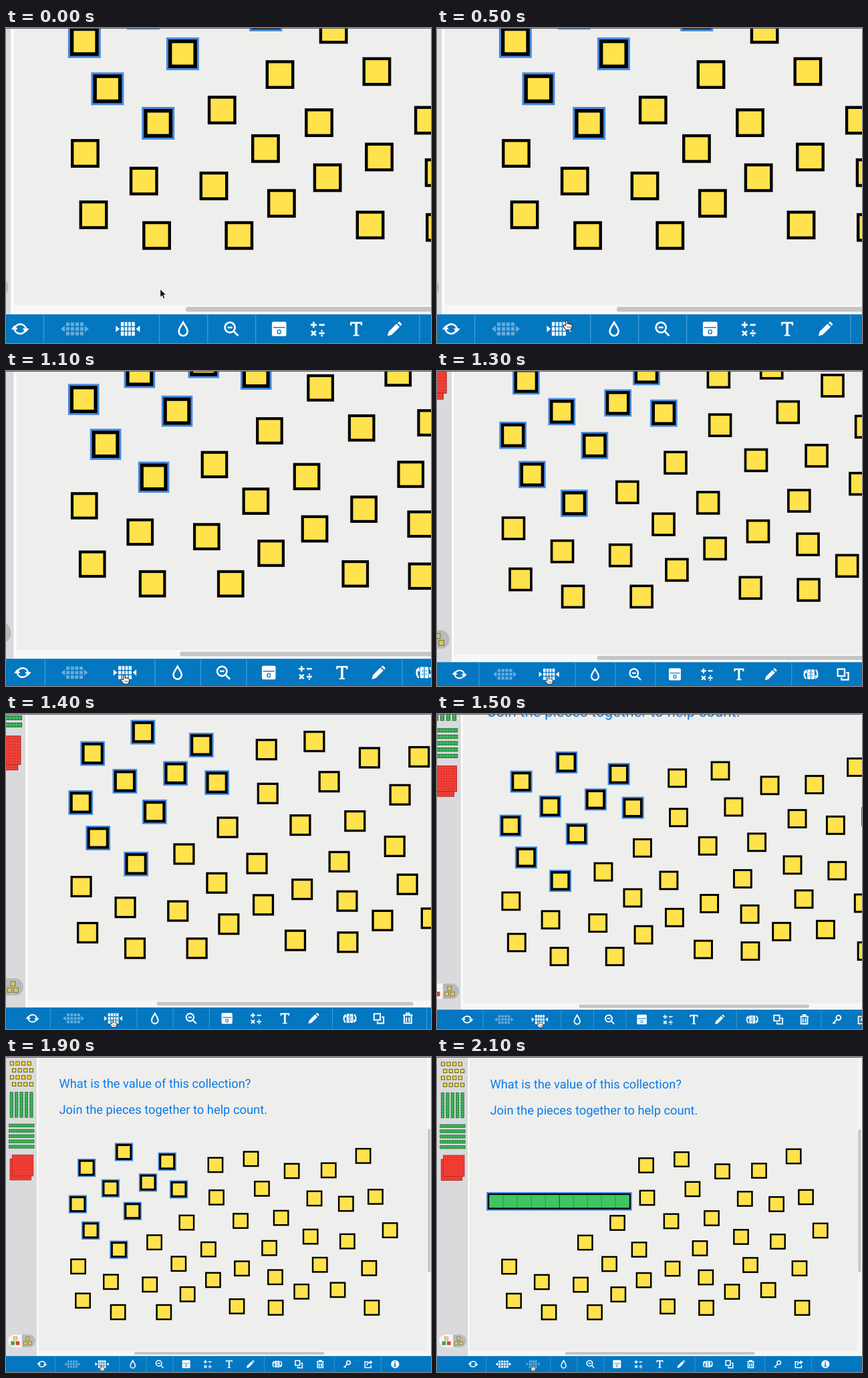
Write an HTML page that moves like this. It is 636 px wide and 471 px high and loops after 5200 ms.

```html
<!DOCTYPE html>
<html lang="en">
<head>
<meta charset="utf-8">
<title>Joining ten ones</title>
<style>
  html, body { margin: 0; width: 100%; height: 100%; overflow: hidden; background: #eeeeed; }
  svg { display: block; width: 636px; height: 471px; }
  text { font: 18.3px Roboto, sans-serif; fill: #0b7ae6; text-rendering: geometricPrecision; }
  .w { fill: #fff; }
  .l { fill: none; stroke: #fff; stroke-width: 1.5; }
  .b { fill: #0477c1; }
  .bl { fill: none; stroke: #0477c1; stroke-width: .8; }
</style>
</head>
<body>
<svg id="stage" viewBox="0 0 636 471"></svg>
<script>
const LOOP = 5200, TICK = 100;
const ORIGIN = [95, 471];
const ZOOM_START = 900, JOIN_AT = 2100;
const ZOOM = [1.798, 1.772, 1.711, 1.612, 1.497, 1.352, 1.214, 1.113, 1.0445, 1.012, 1.002, 1];

const ones = [
  313,162, 366,153, 427,171, 482,170, 533.7,148.5, 314.5,210.5, 382.4,197.5,
  460.8,212, 508,220, 552,209.5, 270,248, 350.5,245.5, 411,241, 455,269,
  510,276, 573.7,259.5, 221.8,277.5, 302.5,288, 393.5,286, 108,313.5,
  258,309.5, 352.5,316.5, 469,311, 542.5,316, 156.8,336.5, 215,340.5,
  309.5,333.7, 402.3,329.5, 441.5,351, 495.7,348.5, 115,364.5, 167.5,381.7,
  271.3,355, 236,381.7, 345,373, 403,375, 546.5,375
];
const picked = [
  176.3,142.7, 120.6,166.3, 240.9,157, 156.3,197, 212.3,188.3,
  258.2,198.5, 107.4,220.6, 189.1,230.8, 126.6,259.8, 168.7,288.5
];

const rect = (x, y, w, h, fill, more = '') =>
  `<rect x="${x}" y="${y}" width="${w}" height="${h}" fill="${fill}" ${more}/>`;
const box = (x, y, size, fill, more) => rect(x - size / 2, y - size / 2, size, size, fill, more);
const path = (cls, d) => `<path class="${cls}" d="${d}"/>`;
const at = (x, y, body, more = '') => `<g transform="translate(${x} ${y})" ${more}>${body}</g>`;
const range = (n, f) => Array.from({ length: n }, (_, i) => f(i)).join('');
const pairs = (list, f) => range(list.length / 2, i => f(list[2 * i], list[2 * i + 1]));

const one = (x, y) => box(x, y, 23.8, '#000') + box(x, y, 18.9, '#ffe24c');
const pickedOne = (x, y) =>
  box(x, y, 27.2, '#438ae0') + box(x, y, 23.8, '#000') + box(x, y, 17.8, '#ffe24c');

function tenBar() {
  return rect(74, 202, 217.6, 27.6, '#438ae0') + rect(76, 204, 213.8, 23.7, '#000') +
    rect(78.2, 206.2, 209.6, 19.2, '#40c562') +
    range(9, i => rect(98.7 + 21 * i, 206.2, i === 4 ? 1.2 : .8, 19.2, i === 4 ? '#17692f' : '#23913f'));
}

function rod(x, y, w, h) {
  const long = Math.max(w, h) / 10, upright = h > w;
  return rect(x, y, w, h, '#3db95b', 'stroke="#1b6a30" stroke-width=".8"') +
    range(9, i => upright
      ? rect(x, y + long * (i + 1) - .2, w, .4, '#1b6a30')
      : rect(x + long * (i + 1) - .2, y, .4, h, '#1b6a30'));
}

function flat(x, y) {
  const size = 31.5, step = size / 10;
  const lines = range(9, i => {
    const d = step * (i + 1);
    return `M${x + d} ${y}v${size}M${x} ${y + d}h${size}`;
  });
  return rect(x, y, size, size, '#fb4238', 'stroke="#a3231d" stroke-width=".8"') +
    `<path d="${lines}" stroke="#c42f28" stroke-width=".45"/>`;
}

function panel() {
  const edge = 'stroke="#574b12" stroke-width=".9"';
  const trio = (x, a, b, c, more) =>
    box(x, 421, 5, a, more) + box(x - 3.6, 428, 5, b, more) + box(x + 3.6, 428, 5, c, more);
  return rect(0, 0, 46.3, 447.5, '#dadadd') + rect(46.3, 0, 2.3, 447.5, '#fcfcfc') +
    range(16, i => {
      const row = i >> 2;
      return box(9 + (row % 2) * 3.2 + (i % 4) * 8.6, 10.5 + row * 10.4, 5.2, '#ffdf45', edge);
    }) +
    range(5, i => rod(6.3 + 7.4 * i, 53.5, 4.3, 37.5)) +
    range(5, i => rod(4.6, 101 + 7.9 * i, 37.5, 4.3)) +
    flat(6.2, 153) + flat(9.4, 147) +
    rect(3, 415, 41, 19, '#bababa', 'rx="9.5"') +
    '<path d="M24 415H12.5a9.5 9.5 0 0 0 0 19H24z" fill="#f5f5f3"/>' +
    trio(14, '#ffdf45', '#2fae4e', '#f23a30', 'stroke="#5a4a30" stroke-width=".4"') +
    trio(32.3, '#d8c860', '#d8c860', '#d8c860', 'stroke="#77703f" stroke-width=".7"');
}

const half = path('l', 'M-4.8 .3A4.9 4.9 0 0 1 4.8 -.3') + path('w', 'M1.9 -.4H7.5L4.7 3z');
const icons = {
  sync: half + `<g transform="rotate(180)">${half}</g>`,
  split: range(12, i => box((i % 4 - 1.5) * 3.9, ((i >> 2) - 1) * 3.9, 2.9, '#fff')) +
    path('w', 'M-8.3 -2.7V2.7L-11.7 0zM8.3 -2.7V2.7L11.7 0z'),
  join: rect(-5.8, -5.7, 11.6, 11.4, '#fff') +
    path('bl', 'M-2.9 -5.7V5.7M0 -5.7V5.7M2.9 -5.7V5.7M-5.8 -1.9H5.8M-5.8 1.9H5.8') +
    path('w', 'M-10 -2.7V2.7L-6.8 0zM10 -2.7V2.7L6.8 0z'),
  drop: path('l', 'M0 -5.4C1.3 -2.8 3.6 -.7 3.6 2.1A3.6 3.6 0 0 1 -3.6 2.1C-3.6 -.7 -1.3 -2.8 0 -5.4z'),
  zoom: '<circle class="l" cx="-1.1" cy="-1.2" r="4.2"/>' +
    path('l', 'M-3.1 -1.2H.9') + path('l', 'M2 1.9L5.8 5.7'),
  board: rect(-6, -6, 12, 12, '#fff', 'rx="1.3"') + path('bl', 'M-5 -1.2H5') +
    '<ellipse class="bl" cy="2.4" rx="1.4" ry="1.6"/>',
  ops: path('l', 'M-5.8 -3.4H-.8M-3.3 -5.9V-.9M1.2 -3.4H5.8M-5.2 1.7L-1.4 5.5M-1.4 1.7L-5.2 5.5M1.2 3.6H5.8') +
    path('w', 'M2.8 .9h1.4v1.4h-1.4zM2.8 4.9h1.4v1.4h-1.4z'),
  type: path('w', 'M-5 -5.8H5V-2.9H3.9L3.4 -4.4H1V4.7L2.5 5V5.8H-2.5V5L-1 4.7V-4.4H-3.4L-3.9 -2.9H-5z'),
  pencil: path('w', 'M-5.8 5.8L-4.9 2.3L1.7 -4.3L4.3 -1.7L-2.3 4.9zM2.5 -5.1L3.3 -5.8Q3.8 -6.2 4.3 -5.8L5.8 -4.3Q6.2 -3.8 5.8 -3.3L5.1 -2.5z'),
  flip: rect(-3.6, -4.9, 7.2, 9.8, '#fff', 'rx=".8"') +
    path('bl', 'M0 -4.9V4.9M-2.3 -1.5H-1M-2.3 1.5H-1M1 -1.5H2.3M1 1.5H2.3') +
    path('l', 'M-4.9 4.5Q-7.8 .8 -5.8 -2.5M4.9 -4.5Q7.8 -.8 5.8 2.5') +
    path('w', 'M-7.7 -2.2L-4.4 -5L-4 -.9zM7.7 2.2L4.4 5L4 .9z'),
  copy: path('l', 'M-5.2 -5.2H1.7V1.7H-5.2z') + path('l', 'M3.2 -1.5H5.4V5.4H-1.4V3.2'),
  trash: path('l', 'M-4 -2.8V5.3H4V-2.8M-5.3 -3.7H5.3M-1.7 -4V-5.6H1.7V-4') +
    path('l', 'M-1.5 -1.2V3.7M1.5 -1.2V3.7'),
  key: '<circle class="l" cx="2.1" cy="-2.2" r="2.8"/>' + path('l', 'M0 0L-5 5M-3.6 3.4L-1.9 5.1'),
  share: path('l', 'M0 -3.6H-5V5.2H4.2V1.6') + path('l', 'M-2 2Q-1.6 -2.3 3 -2.8') +
    path('w', 'M2.4 -5.8L6.6 -2.7L2.4 .4z'),
  info: '<circle class="w" r="6.1"/>' + path('b', 'M-.9 -4H.9V-2.2H-.9zM-1.6 -1.1H.9V2.7H1.7V3.9H-1.7V2.7H-.9V.1H-1.6z')
};
const slots = {
  sync: 54, split: 99.4, join: 143.5, drop: 189.5, zoom: 229.5, board: 269.3, ops: 301.3, type: 333.4,
  pencil: 365.2, flip: 405.3, copy: 437.3, trash: 469.5, key: 509.6, share: 541.2, info: 581.3
};

function toolbar() {
  return rect(0, 447.2, 636, 24, '#0477c1') +
    [73.2, 169.4, 209.4, 249.4, 385.6, 490, 560].map(x => rect(x, 447.2, .8, 24, '#3d98d3')).join('') +
    Object.keys(slots).map(k => at(slots[k], 459.3, icons[k], `id="${k}"`)).join('');
}

const scrollbars = rect(48.6, 439.4, 588, 7.8, '#f7f7f7') + rect(628.8, 0, 7.2, 447.2, '#f5f5f5') +
  rect(191.6, 441, 284, 4, '#c5c5c6', 'rx="2"') + rect(630.3, 108, 4, 214, '#c5c5c6', 'rx="2"');

const arrow = '<path d="M0 0V6.9L1.6 5.4L2.7 8L4 7.4L2.9 5H5z" fill="#111" stroke="#fff" stroke-width=".5"/>';
const hand = '<path d="M-.7 4.6V.7Q0 -.4 .7 .7V3Q1.4 2.4 2 3.2Q2.7 2.6 3.3 3.5Q4.2 3.1 4.5 4.2V6L3.6 8.2H-.5L-2.7 5.2Q-2.9 4 -1.7 4.1z" fill="#fff" stroke="#222" stroke-width=".6"/>' +
  '<path d="M.7 5.2V6.9M2 5.2V6.9M3.2 5.2V6.9" stroke="#222" stroke-width=".4"/>';

const stage = document.getElementById('stage');
stage.innerHTML = '<g id="scene">' + rect(0, 0, 636, 471, '#eeeeed') + scrollbars + panel() +
  '<text x="79.5" y="47">What is the value of this collection?</text>' +
  '<text x="79.5" y="86">Join the pieces together to help count.</text>' +
  pairs(ones, one) + `<g id="loose">${pairs(picked, pickedOne)}</g><g id="bar">${tenBar()}</g>` + toolbar() +
  `<g id="cursor"><g id="arrow">${arrow}</g><g id="hand">${hand}</g></g></g>` +
  rect(0, 0, 636, 1, '#5c5d60');

const el = id => document.getElementById(id);
const [scene, loose, bar, cursor, arrowEl, handEl, splitEl, joinEl] =
  ['scene', 'loose', 'bar', 'cursor', 'arrow', 'hand', 'split', 'join'].map(el);
const show = (node, on) => node.setAttribute('visibility', on ? 'visible' : 'hidden');
const dim = (node, on) => node.setAttribute('opacity', on ? .4 : 1);

function draw(ms) {
  const t = Math.floor(ms / TICK) * TICK;
  const step = Math.min(ZOOM.length - 1, (t - ZOOM_START) / TICK);
  const s = step < 0 ? 1.8 : ZOOM[step];
  const [ox, oy] = ORIGIN;
  scene.setAttribute('transform', `translate(${ox * (1 - s)} ${oy * (1 - s)}) scale(${s})`);

  const p = Math.min(1, Math.max(0, (t - 100) / 600));
  const k = p * p * (3 - 2 * p);
  const y = 426.2 + 34.8 * k;
  cursor.setAttribute('transform', `translate(${170.4 - 27.6 * k} ${y})`);
  const over = y > 447;
  show(arrowEl, !over);
  show(handEl, over);

  const joined = t >= JOIN_AT;
  show(loose, !joined);
  show(bar, joined);
  dim(splitEl, !joined);
  dim(joinEl, joined);
}

function frame() {
  draw(performance.now() % LOOP);
  requestAnimationFrame(frame);
}
frame();
</script>
</body>
</html>
```
